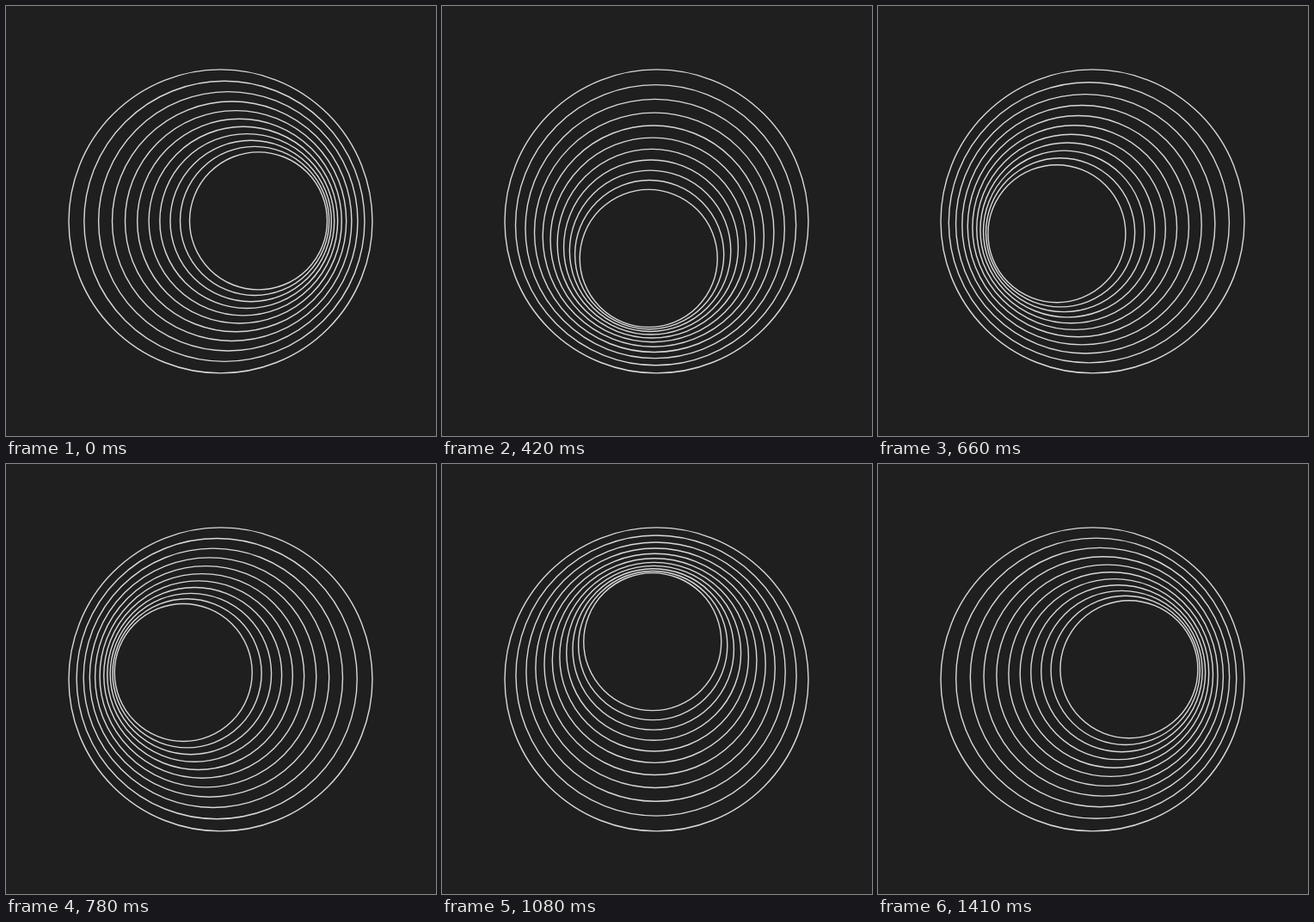
An HTML page with a canvas that plays this animation: 500 by 500 pixels, repeating every 1440 ms.

```html
<!DOCTYPE html>
<html lang="en">
<head>
<meta charset="utf-8">
<title>Orbiting rings</title>
<style>
  html, body { margin: 0; height: 100%; overflow: hidden; background: #1f1f1f; }
  canvas { display: block; }
</style>
</head>
<body>
<canvas id="stage" width="500" height="500"></canvas>
<script>
const ctx = document.getElementById("stage").getContext("2d");
const CENTER = { x: 249.5, y: 250.4 };
const RINGS = 11, OUTER = 176.5, INNER = 80, ORBIT = 44;
const STEP_MS = 30, STEPS = 48;
const TURN = 2 * Math.PI;
const SHRINK = (INNER / OUTER) ** (1 / (RINGS - 1));

function draw(step) {
  // The last of 49 equal steps is skipped, so the loop closes with a small jump.
  const angle = TURN * step / (STEPS + 1) - 0.012;
  ctx.fillStyle = "#1f1f1f";
  ctx.fillRect(0, 0, 500, 500);
  ctx.strokeStyle = "#d8d8d8";
  ctx.lineWidth = 1.4;
  for (let i = 0; i < RINGS; i++) {
    const offset = ORBIT * i / (RINGS - 1);
    ctx.beginPath();
    ctx.arc(CENTER.x + offset * Math.cos(angle), CENTER.y + offset * Math.sin(angle),
      OUTER * SHRINK ** i, 0, TURN);
    ctx.stroke();
  }
}

const start = performance.now();
function tick() {
  draw(Math.floor((performance.now() - start) / STEP_MS) % STEPS);
  requestAnimationFrame(tick);
}
tick();
</script>
</body>
</html>
```
